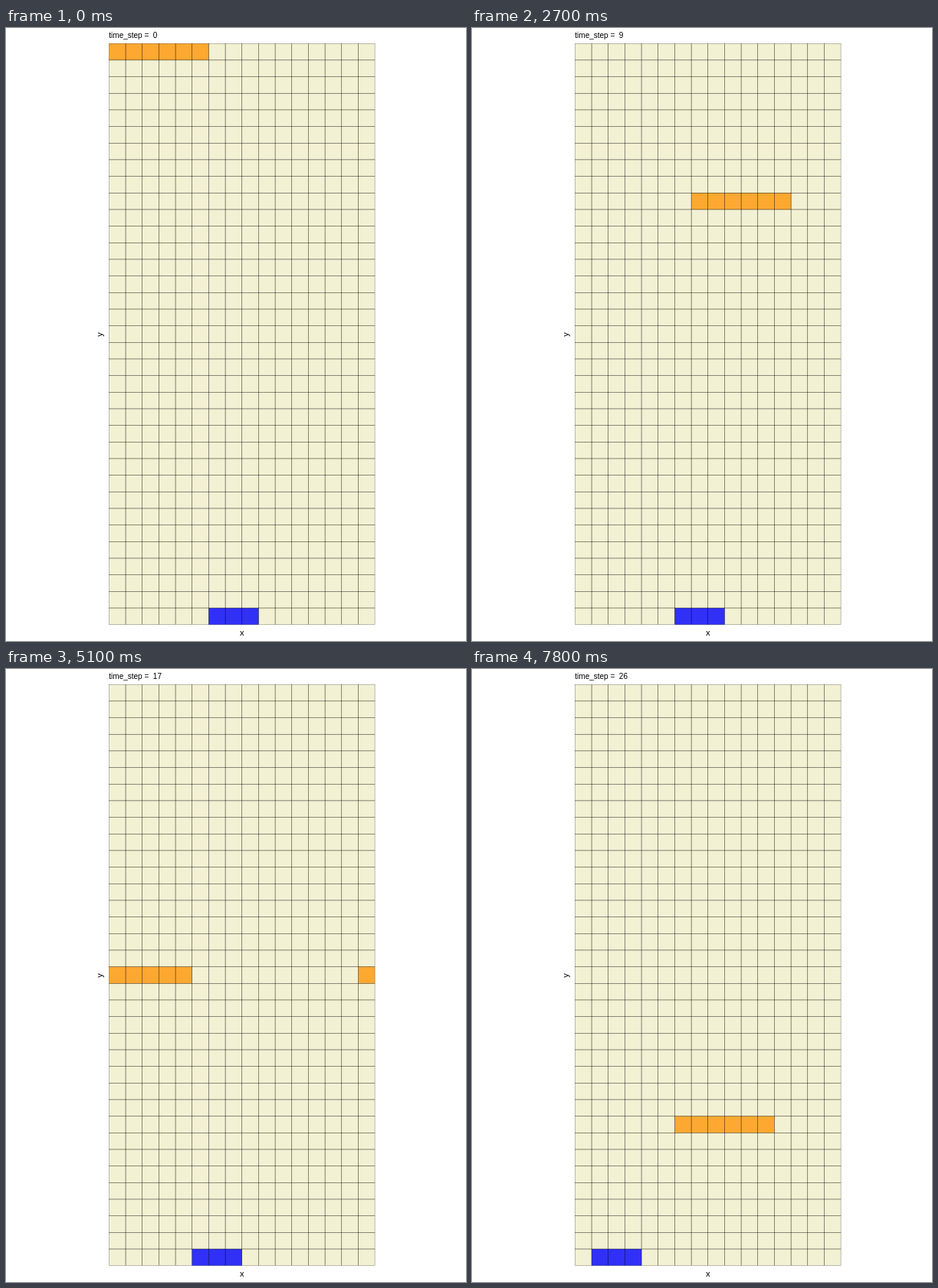
These frames come from a looping animation (600x800 px, 8000 ms). An HTML page:

```html
<!DOCTYPE html>
<html lang="en">
<head>
<meta charset="utf-8">
<title>Grid world</title>
<style>
  html, body { margin: 0; width: 100%; height: 100%; overflow: hidden; background: #fff; }
  svg { display: block; width: 600px; height: 800px; }
  text { font-family: "Liberation Sans", Arial, sans-serif; font-size: 11px; fill: #000; }
  #step { font-size: 10px; white-space: pre; }
  .axis { text-anchor: middle; }
  #lines rect { fill: none; stroke: #000; stroke-opacity: .5; stroke-width: .5; }
</style>
</head>
<body>
<svg viewBox="0 0 600 800">
  <text id="step" x="134.3" y="13"></text>
  <g id="cells"></g>
  <g id="lines"></g>
  <text class="axis" x="307.8" y="793">x</text>
  <text class="axis" transform="translate(126.2 400) rotate(-90)">y</text>
</svg>
<script>
  const COLS = 16, ROWS = 35, SIZE = 21.67, LEFT = 134.4, TOP = 20.2;
  const STEP_MS = 300, LOOP_MS = 8000;
  const BAR = 6, PADDLE = 3;
  const label = document.getElementById("step");
  const cells = document.getElementById("cells");
  const lines = document.getElementById("lines");

  // Time steps at which the paddle moves one column, and the direction.
  const moves = [[7, -1], [8, 1], [16, -1], [19, -1], [22, -1], [24, -1], [26, -1]];

  function addRect(parent, col, row, w, h, fill) {
    const r = document.createElementNS("http://www.w3.org/2000/svg", "rect");
    const attrs = { x: LEFT + col * SIZE, y: TOP + row * SIZE, width: w * SIZE, height: h * SIZE };
    for (const k in attrs) r.setAttribute(k, attrs[k].toFixed(2));
    if (fill) r.setAttribute("fill", fill);
    parent.appendChild(r);
  }

  function paddleCol(step) {
    return moves.reduce((col, [at, dir]) => step >= at ? col + dir : col, 6);
  }

  function draw(step) {
    label.textContent = "time_step = \u00a0" + step;
    cells.textContent = "";
    addRect(cells, 0, 0, COLS, ROWS, "#f2f1d3");

    // The bar drifts left, wraps around and falls one row per step.
    const start = (COLS - step % COLS) % COLS;
    const head = Math.min(BAR, COLS - start);
    addRect(cells, start, step, head, 1, "#fda830");
    if (head < BAR) addRect(cells, 0, step, BAR - head, 1, "#fda830");

    addRect(cells, paddleCol(step), ROWS - 1, PADDLE, 1, "#3030f7");
  }

  for (let row = 0; row < ROWS; row++)
    for (let col = 0; col < COLS; col++) addRect(lines, col, row, 1, 1);

  const begin = performance.now();
  let shown = -1;

  function tick() {
    const step = Math.floor((performance.now() - begin) % LOOP_MS / STEP_MS);
    if (step !== shown) draw(shown = step);
    requestAnimationFrame(tick);
  }
  tick();
</script>
</body>
</html>
```
